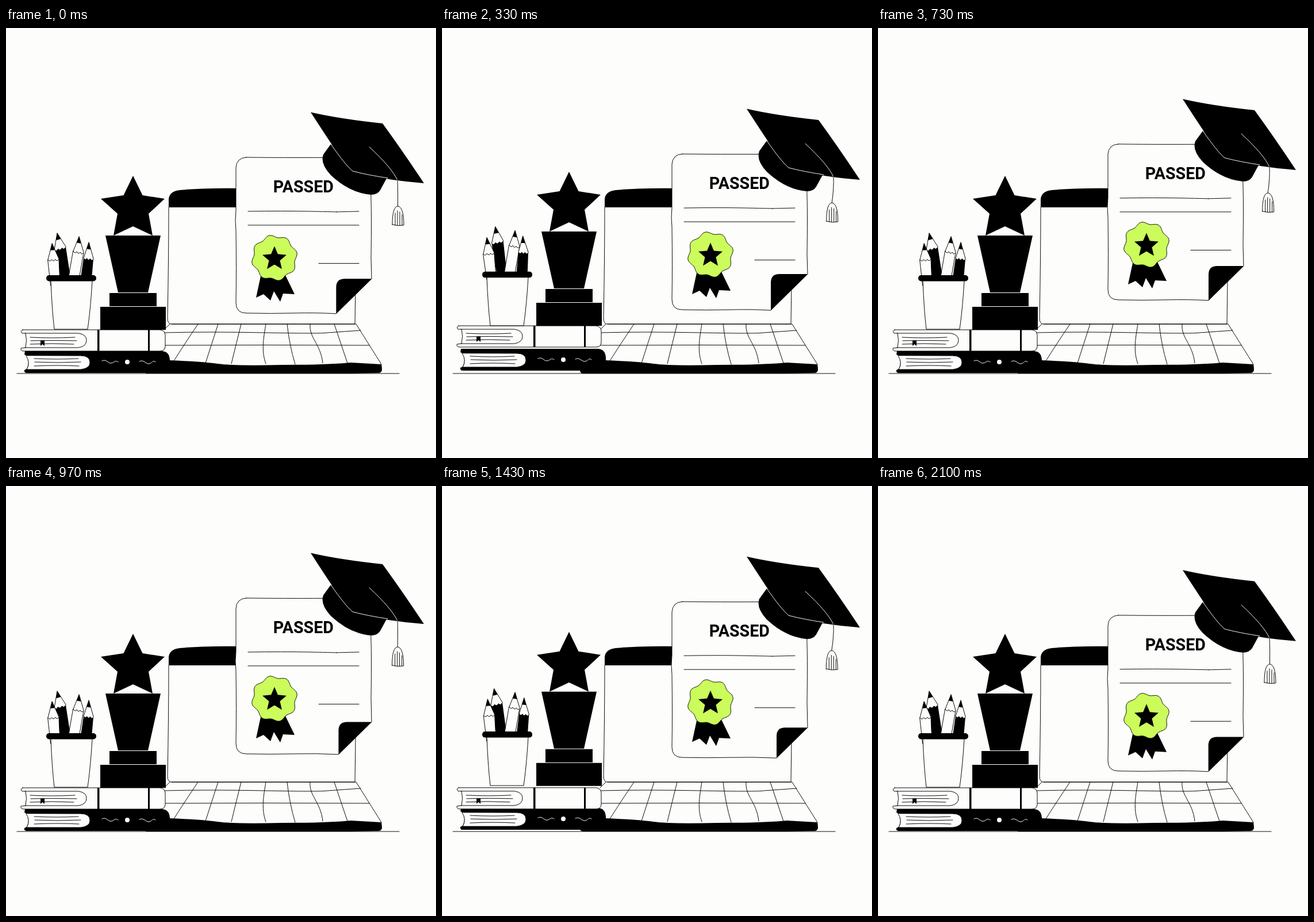
These frames come from a looping animation (748 px wide and 748 px high, 2.13 s). An HTML page:

```html
<!DOCTYPE html>
<html lang="en">
<head>
<meta charset="utf-8">
<style>
html, body { margin: 0; width: 100%; height: 100%; overflow: hidden; background: #fdfdfc; }
svg { display: block; width: 100vw; height: 100vh; }
path, line { fill: none; stroke: #000; stroke-width: .95; stroke-linejoin: round; stroke-linecap: round; }
.w { fill: #fdfdfc; }
.k { fill: #000; stroke: none; }
.l { stroke: #fdfdfc; }
text { font: bold 28.6px Roboto, Arial, sans-serif; text-anchor: middle; }
</style>
</head>
<body>
<svg viewBox="0 0 748 748">
  <path d="M19 601H684"/>

  <!-- laptop -->
  <path class="w" d="M283 312Q283 400 281 505Q281 515 288 515H607Q609 400 608 290H400Z"/>
  <path class="k" d="M283 312V298Q284 284 302 282Q350 278 410 279V312Z"/>
  <path d="M288 515H609L653 585M285 515L275 525M276 530Q350 528 450 530T560 530L617 526M272 552Q450 551 632 552"/>
  <path d="M334 515Q311 549 292 579M369 515Q357 552 347 583M409 515Q401 547 392 584M452 515C449 535 443 560 452 584M489 515Q493 552 503 585M529 515C527 540 547 548 551 583M571 515L594 583"/>
  <path class="k" d="M240 589L284 578Q340 580 368 584T480 586Q560 586 600 582L653 585Q654 590 654 595Q653 600 648 600L600 601L246 601Q240 601 240 595Z"/>

  <g id="low">
    <path class="k" d="M33 562H270Q284 562 285 577V600H36Q31 600 32 595L36 593Q42 582 36 570L32 568Z"/>
    <path class="w" d="M35 570Q43 582 36 594H130Q146 592 146 582Q146 570 130 570Z"/>
    <path d="M49 575Q90 577 126 575M50 581Q90 583 130 581M49 588Q90 586 127 588"/>
    <path class="l" d="M167 579C175 575 177 584 183 583S189 577 195 581M232 580C240 576 243 585 249 584S254 577 260 581"/>
    <circle cx="211" cy="581" r="4" fill="#fdfdfc"/>
  </g>

  <g id="top">
    <path class="w" d="M29 525H268Q277 526 277 535V553Q277 562 268 562H31Q25 562 26 557L34 556Q37 543 34 531L28 531Q24 527 29 525Z"/>
    <path d="M33 531H126Q140 533 140 543Q140 554 126 556H33M42 538Q80 540 120 538M43 544Q80 543 123 544M42 550Q80 548 118 550"/>
    <path class="k" d="M60 544H67V553L63.5 550L60 553ZM159 525H162.500V562H159ZM247 525H250V562H247Z"/>
  </g>

  <g id="pencils"></g>
  <g id="cup">
    <path class="w" d="M78 440Q80 490 84 524H142Q147 490 150 440Z"/>
    <rect x="70" y="430" width="87" height="10.500" rx="5"/>
  </g>

  <g id="trophy">
    <path class="k" d="M221 257L237.500 291L276 297L248 323L255 361L221 345L187 361L194 323L165 297L204.500 291Z"/>
    <path class="k" d="M173 361H269L247 460H195ZM180 461H262V484H180ZM164 485H278V525H164Z"/>
  </g>

  <g id="paper">
    <path class="w" id="sheet"/>
    <path class="k" id="fold"/>
    <text x="517.3" y="286">PASSED</text>
    <path d="M421 319Q480 318 530 319T575 320T614 319M421 343H614M544 409.500H614"/>
    <path class="k" d="M443 432L435 469L448 463L460 474L466 458L477 476L482 462L502 463L486 430Z"/>
    <path id="badge" style="fill:#cbfc5b"/>
    <path class="k" id="star"/>
    <path class="k" d="M565 202L552 220Q546 236 565 256Q598 287 635 290Q646 290 651 282L664 258Z"/>
    <path class="k" d="M530 146.500Q580 158 655 166Q690 214 727 270Q660 265 603 250Q594 242 571 209Q549 176 530 146.500Z"/>
    <path class="l" d="M565 202Q590 238 603 249Q630 256 664 261M632 207Q672 244 681 265"/>
    <path id="cord"/>
    <g id="tassel">
      <path class="w" d="M672 342Q672 310 682 310Q692 312 692 343Q682 345 672 342Z"/>
      <path d="M677 343V322M681 343V318M685 343V320M689 343V325"/>
    </g>
  </g>
</svg>
<script>
const LOOP = 2130, TAU = Math.PI * 2;
const $ = id => document.getElementById(id);
const shift = (id, x, y) => $(id).setAttribute('transform', `translate(${x} ${y})`);
const trace = (id, d) => $(id).setAttribute('d', d);
const ring = (n, cx, cy, radius) => 'M' + Array.from({ length: n }, (_, i) => {
  const a = i / n * TAU - TAU / 4, r = radius(i, a);
  return `${(cx + r * Math.cos(a)).toFixed(2)} ${(cy + r * Math.sin(a)).toFixed(2)}`;
}).join('L') + 'Z';

trace('badge', ring(180, 467, 400, (i, a) => 37.8 + 2.2 * Math.cos(8 * (a + 1.8))));
trace('star', ring(10, 467, 401.5, i => i % 2 ? 10 : 22));

// tip, left shoulder, right shoulder, left foot, right foot, body class, tilt
const pencils = [
  [[89, 357], [84, 386], [104, 381], [97, 448], [114, 446], 'k', 3.5],
  [[80, 375], [73, 403], [92, 402], [78, 448], [94, 448], 'w', -2.5],
  [[127, 363], [117, 388], [135, 391], [107, 446], [125, 448], 'w', 0],
  [[144, 373], [135, 400], [152, 402], [128, 448], [148, 448], 'k', -4]
];
const mix = (a, b, k) => [a[0] + (b[0] - a[0]) * k, a[1] + (b[1] - a[1]) * k];
$('pencils').innerHTML = pencils.map(([tip, l, r, fl, fr, body]) => {
  const a = mix(l, r, 1 / 3), b = mix(l, r, 2 / 3);
  const scallop = [[l, a], [a, b], [b, r]].map(([p, q]) => {
    const m = mix(p, q, .5);
    return `Q${m[0]} ${m[1] + 5} ${q}`;
  }).join('');
  return `<g><path class="${body}" d="M${l}L${r}L${fr}L${fl}Z"/>
    <path class="w" d="M${tip}L${l}${scallop}Z"/>
    <path class="k" d="M${tip}L${mix(tip, l, .42)}L${mix(tip, r, .42)}Z"/></g>`;
}).join('');
const pencilNodes = [...$('pencils').children];

const hump = (t, centre, half) => {
  const x = (t - centre) / half;
  return Math.abs(x) < 1 ? Math.cos(x * Math.PI / 2) ** 2 : 0;
};
const hops = (t, first, second, half) => hump(t, first, 240) + hump(t, second, half);

function draw(now) {
  const t = now % LOOP;

  const hop = hops(t, 400, 1558, 220);
  shift('low', 0, -5 * hop);
  shift('top', 0, -8.6 * hops(t, 400, 1600, 185));
  shift('trophy', 0, -8.6 * hop);
  shift('cup', 0, -7.6 * hop);
  const swing = hops(t, 415, 1570, 215);
  pencilNodes.forEach((node, i) => {
    const p = pencils[i];
    node.setAttribute('transform',
      `translate(0 ${-14.5 * swing}) rotate(${p[6] * swing} ${p[3][0] + 8} 440)`);
  });

  shift('paper', 0, -15.5 * (1 - Math.cos(TAU * (t - 25) / LOOP)));
  const x = 577 - 5 * Math.cos(TAU * (t - 340) / LOOP), y = x - 138;
  trace('sheet', `M418 225Q500 226 618 225Q636 226 635 243Q634 270 635 300T635 400L636 ${y}L${x} 497Q540 495 500 496T418 496Q400 496 400 478Q401 420 400 352Q398 335 400 318V243Q401 226 418 225Z`);
  trace('fold', `M${x} 497V${y + 15}Q${x} ${y} ${x + 15} ${y}H636Z`);
  const sway = -2.4 * (1 - Math.cos(2 * TAU * t / LOOP));
  shift('tassel', sway, 0);
  trace('cord', `M681 264Q682 285 ${681.5 + sway} 310`);
}

const start = performance.now();
function tick() {
  draw(performance.now() - start);
  requestAnimationFrame(tick);
}
tick();
</script>
</body>
</html>
```
